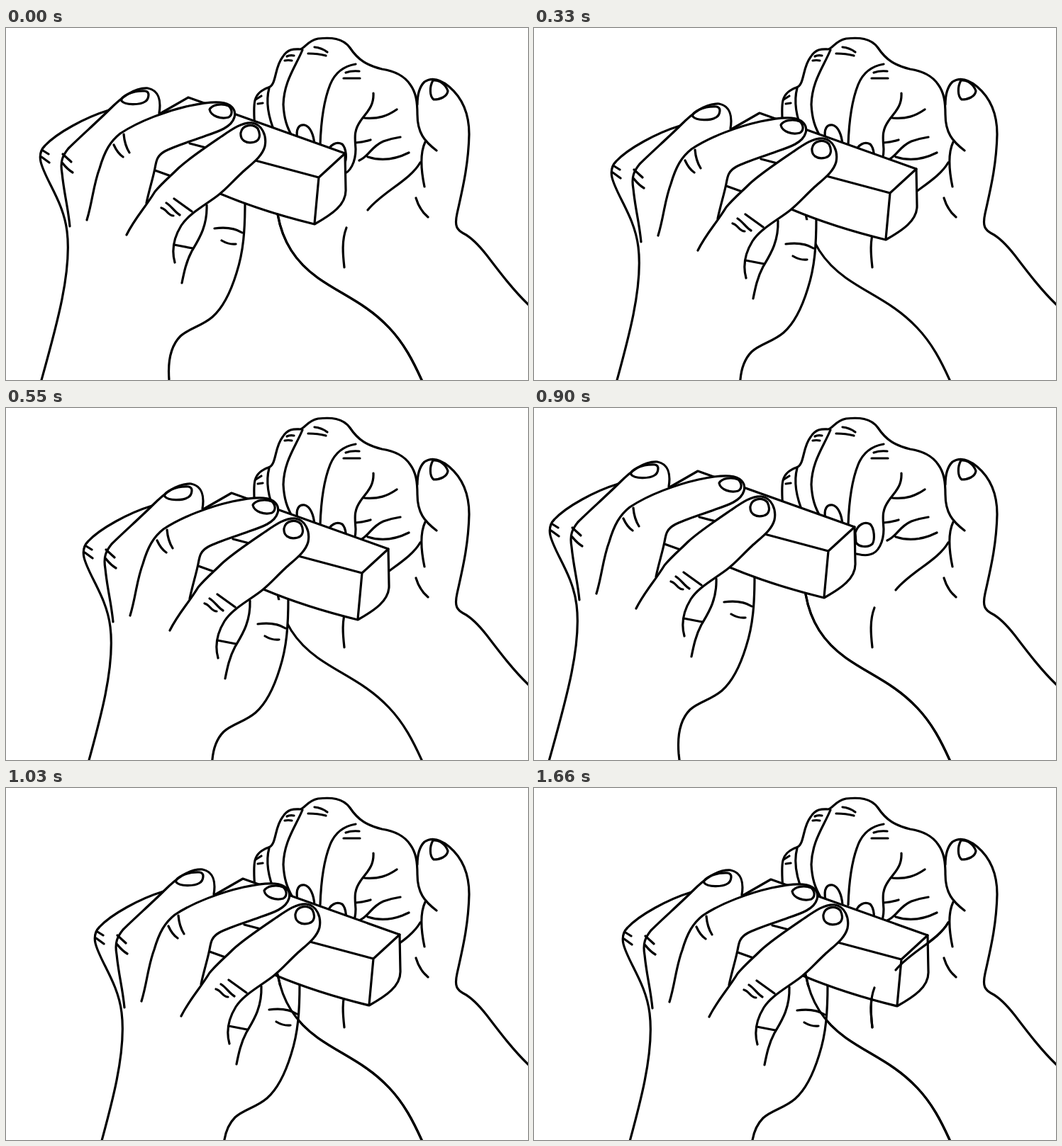
Animation, 736 px wide and 497 px high, one loop 1.99 s. Source, as an HTML page:

```html
<!DOCTYPE html>
<html lang="en">
<head>
<meta charset="utf-8">
<title>Hands sliding a box</title>
<style>
  html, body { margin: 0; width: 100%; height: 100%; overflow: hidden; background: #fff; }
  svg { display: block; width: 736px; height: 497px; }
  path { fill: none; stroke: #000; stroke-width: 3.2; stroke-linecap: round; stroke-linejoin: round; }
  .solid { fill: #fff; }
  .mask { fill: #fff; stroke: none; }
</style>
</head>
<body>
<svg viewBox="0 0 736 497">
  <g id="right-hand">
    <!-- knuckles, fist and palm edge -->
    <path d="M351 143C348 104 348 92 370 84C382 80 378 56 390 41C398 28 408 30 415 30C422 28 425 18 440 15C458 13 475 14 485 28C497 46 510 53 530 58C550 61 562 68 570 80C578 91 580 104 580 122C580 148 590 160 607 173"/>
    <path d="M371 85C367 100 368 122 380 150"/>
    <path d="M418 31C408 55 392 75 391 108C392 128 396 140 404 154"/>
    <path d="M493 51C475 54 463 65 457 80C447 105 444 135 443 165"/>
    <path d="M518 92C519 112 507 120 500 131C490 145 492 155 493 171C493 188 486 205 473 207C466 209 460 207 455 206"/>
    <!-- nails -->
    <path d="M453 176C457 164 466 160 474 164C480 170 481 186 477 192C470 198 458 196 454 190Z"/>
    <path d="M411 158C408 142 413 136 421 137C429 139 434 151 435 165"/>
    <path id="small-nail" d="M379 143C381 135 388 135 395 148"/>
    <!-- knuckle creases -->
    <path d="M352 101L360 96M355 107L362 106M396 40Q400 38 406 39M393 46Q398 45 403 46M435 27Q445 28 453 34M426 36Q440 36 451 39M479 63Q487 60 498 61M476 71H499"/>
    <!-- palm creases -->
    <path d="M505 127C525 129 538 124 551 115M493 162Q505 161 514 158M498 187C512 181 514 168 532 160Q543 156 556 154M510 182C528 188 548 186 568 176M591 161C583 178 585 200 590 224M578 240Q583 257 595 267"/>
    <path id="palm-line" d="M584 190C570 215 530 232 510 257"/>
    <path id="wrist-line" d="M480 282C473 300 475 320 477 338"/>
    <!-- thumb and forearm -->
    <path d="M580 108C580 95 583 83 590 76C601 69 613 73 625 83C645 100 653 125 653 150C652 195 643 230 636 262C632 280 636 285 645 290C655 295 667 307 678 321C697 346 716 371 737 391"/>
    <path d="M602 74C597 83 597 96 603 101C612 101 622 97 623 89C621 82 613 73 602 74"/>
    <path id="forearm" d="M383 263C390 302 408 330 440 353C474 377 508 389 540 423C561 445 574 470 587 499"/>
  </g>

  <g id="left-hand">
    <!-- thumb and arm -->
    <path class="mask" d="M248 360L283 250L337 249C337 285 335 315 325 346C317 372 307 394 291 408Z"/>
    <path d="M337 245C337 285 335 315 325 346C317 372 307 394 291 408C276 421 258 424 246 435C232 449 228 472 230 497L232 515"/>
    <path d="M283 250C284 280 272 298 262 315C254 330 251 345 248 360M237 306L263 311M294 283C309 281 322 282 333 289M304 300C309 303 315 306 324 305"/>
    <!-- box -->
    <path class="solid" d="M217 121L257 98L478 177L479 228C480 250 458 264 435 277C390 266 340 250 302 234L210 201"/>
    <path d="M259 163L355 188L441 211L478 177M441 211L435 276"/>
    <!-- little finger and arm -->
    <path d="M145 116C112 126 72 148 55 166C49 172 47 180 49 189C55 214 81 245 86 287C93 343 72 418 50 497L45 515M52 173L60 178M50 182L61 190"/>
    <!-- ring finger -->
    <path class="solid" d="M90 280C87 250 82 235 79 205C76 188 80 180 88 170C104 154 128 133 146 115C162 99 180 84 200 85C215 88 219 102 216 120"/>
    <path d="M163 103C160 97 178 88 196 89C204 90 201 101 196 104C188 109 168 109 163 103ZM80 178L92 189M79 190C84 196 87 200 94 204"/>
    <!-- middle finger -->
    <path class="solid" d="M114 271C122 245 123 222 132 198C139 174 147 160 161 149C188 131 227 117 258 110C276 106 290 104 302 105C317 106 325 115 322 126C318 140 300 146 282 152C258 161 240 166 224 174C212 181 212 188 210 198C207 213 202 228 198 247"/>
    <path d="M287 115C291 108 304 106 314 110C320 116 319 123 314 126C304 129 289 125 287 115ZM166 150C167 162 169 168 174 176M152 165C156 174 159 178 165 182"/>
    <!-- index finger -->
    <path class="solid" d="M170 292C182 268 196 254 210 231C220 219 232 209 243 198C258 184 282 168 304 153C320 142 333 133 347 134C361 136 368 152 365 167C361 182 346 192 333 204C319 217 311 227 298 237C278 252 258 262 247 279C236 297 233 313 238 331"/>
    <path d="M331 148C333 137 347 134 355 142C360 152 357 159 350 161C338 164 330 158 331 148ZM237 241L262 259M226 247C234 252 238 260 245 264M219 254C227 256 228 265 236 265"/>
  </g>

  <!-- lines of the right hand that can lie above the left one -->
  <use class="overlay" href="#forearm"/>
  <use class="overlay" href="#palm-line"/>
  <use class="overlay" href="#wrist-line"/>
</svg>
<script>
  const LOOP = 1990;
  // overlays: how many of the overlay lines are shown
  const poses = [
    { start: 0, x: 0, y: 0, overlays: 1 },
    { start: 330, x: 61, y: 22, overlays: 0 },
    { start: 700, x: -26, y: -9, overlays: 1 },
    { start: 1030, x: 77, y: 30, overlays: 1 },
    { start: 1360, x: 6, y: 2, overlays: 1, smallNail: true },
    { start: 1660, x: 77, y: 31, overlays: 3 }
  ];
  const leftHand = document.getElementById('left-hand');
  const smallNail = document.getElementById('small-nail');
  const overlays = document.querySelectorAll('.overlay');
  const show = (element, visible) => element.setAttribute('visibility', visible ? 'visible' : 'hidden');

  function draw() {
    const time = performance.now() % LOOP;
    const pose = poses.findLast(p => p.start <= time);
    leftHand.setAttribute('transform', `translate(${pose.x} ${pose.y})`);
    show(smallNail, pose.smallNail);
    overlays.forEach((line, i) => show(line, i < pose.overlays));
    requestAnimationFrame(draw);
  }
  draw();
</script>
</body>
</html>
```
